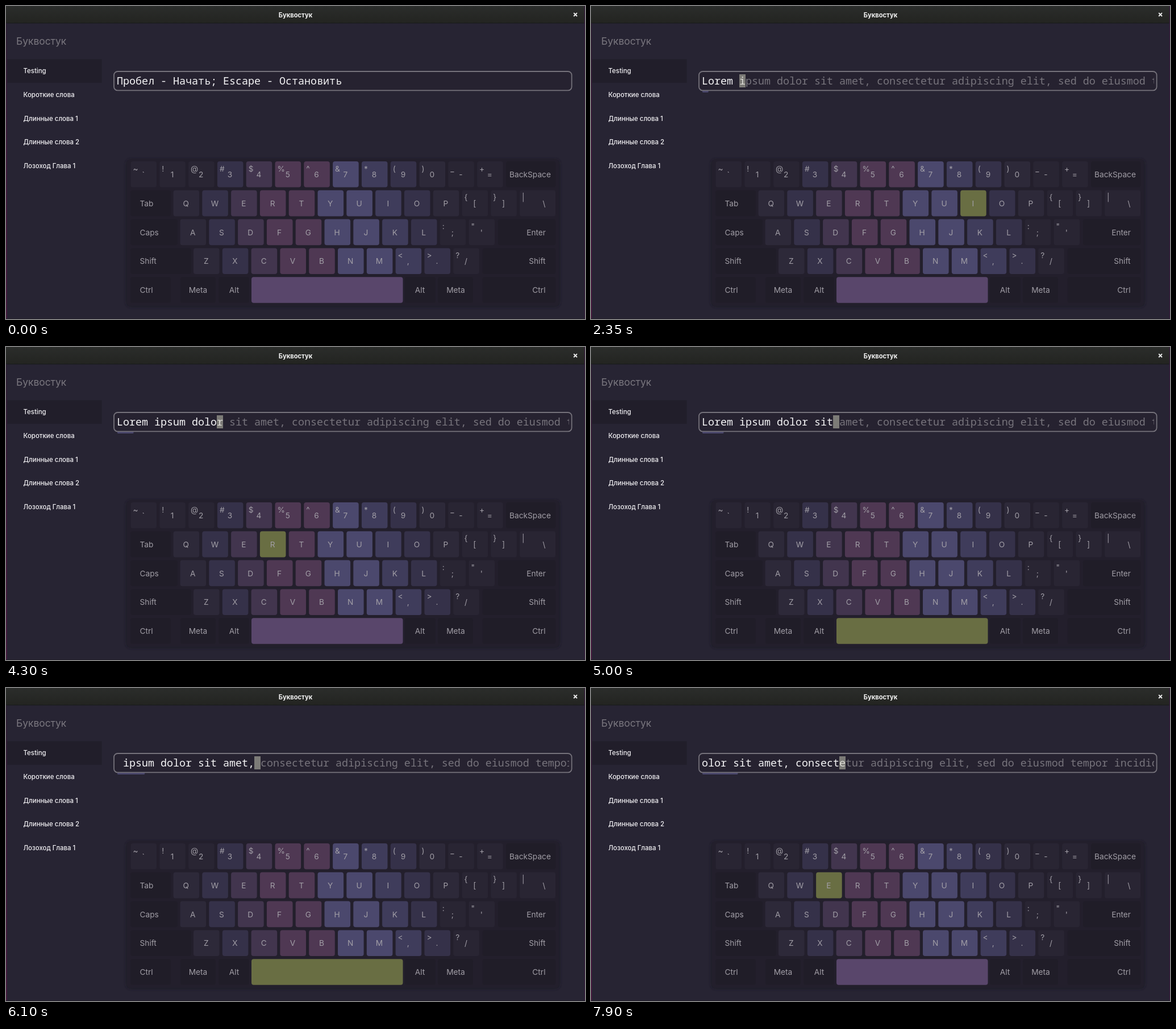
These frames come from a looping animation (1019 by 550 pixels, 8 s). An HTML page:

```html
<!DOCTYPE html>
<html lang="ru">
<head>
<meta charset="utf-8">
<title>Буквостук</title>
<style>
  html, body { margin: 0; width: 100%; height: 100%; overflow: hidden; background: #272433; }
  svg { display: block; width: 100vw; height: 100vh; }
  text { font-family: Inter, "Noto Sans", sans-serif; }
  .key { font-size: 13.7px; fill: #a19ea6; }
  .item { font-size: 11.45px; font-weight: 500; fill: #f3f2f5; }
  .line { font: 500 18.33px "Noto Sans Mono", "DejaVu Sans Mono", monospace; white-space: pre; }
</style>
</head>
<body>
<svg id="stage" viewBox="0 0 1019 550" preserveAspectRatio="none">
  <defs>
    <linearGradient id="bar" x2="0" y2="1">
      <stop offset="0" stop-color="#2b2d2b"/><stop offset="1" stop-color="#232421"/>
    </linearGradient>
    <linearGradient id="edge" x2="0" y2="1">
      <stop offset="0" stop-color="#2a1b30"/><stop offset=".45" stop-color="#43173c"/><stop offset="1" stop-color="#4b1740"/>
    </linearGradient>
    <filter id="soft" x="-5%" y="-5%" width="110%" height="115%"><feGaussianBlur stdDeviation="2"/></filter>
    <clipPath id="field"><rect x="194" y="116" width="797" height="32"/></clipPath>
  </defs>
</svg>
<script>
const LOOP = 8000;
const CELL = 11, LEFT = 195, STEP = 1.784, HOLD = 22;
const KEY = 45.6, PITCH = 50.8, TOP = 273;
const LIT = '#696e43', DARK = '#201d28';
const PROMPT = 'Пробел - Начать; Escape - Остановить';
const TEXT = 'Lorem ipsum dolor sit amet, consectetur adipiscing elit, sed do eiusmod ' +
  'tempor incididunt ut labore et dolore magna aliqua.';

// moment at which each character becomes the current one
const TIMES = [
  650, 1500, 1750, 1900, 2050, 2200, 2350, 2750, 2900, 3050, 3200,
  3450, 3600, 3700, 3850, 4050, 4300, 4400, 4600, 4750, 4850, 5000, 5150,
  5350, 5500, 5650, 5850, 6000, 6200, 6550, 6700, 6850, 7050, 7200, 7450, 7850
];

// key tints by finger zone
const TINT = {
  o: '#292533', a: '#2d2939', b: '#353149', c: '#42354e',
  d: '#4f3853', e: '#4b486d', f: '#3f3c5b'
};
// first key x, base symbols, shifted symbols, zones
const ROWS = [
  [219.5, '`1234567890-=', '~!@#$%^&*()_+', 'ooobcddefbaoo'],
  [294.5, 'QWERTYUIOP[]\\', '          {}|', 'abcddeefbaooo'],
  [306.5, 'ASDFGHJKL;\'', '         :"', 'abcddeefboo'],
  [330, 'ZXCVBNM,./', '       <>?', 'abcddeefbo']
];
// label, row, x, width, label x, anchor
const WIDE = [
  ['BackSpace', 0, 880, 87.5, 922.5, 'middle'],
  ['Tab', 1, 219, 71, 235.5, 'start'],
  ['Caps', 2, 219, 83, 235.5, 'start'],
  ['Enter', 2, 866, 101.5, 950, 'end'],
  ['Shift', 3, 219, 107, 235.5, 'start'],
  ['Shift', 3, 838.5, 129, 949.5, 'end'],
  ['Ctrl', 4, 219, 71, 235.5, 'start'],
  ['Meta', 4, 307, 62, 338, 'middle'],
  ['Alt', 4, 374, 54, 401.5, 'middle'],
  ['Alt', 4, 702, 54, 728.5, 'middle'],
  ['Meta', 4, 760, 62, 791.5, 'middle'],
  ['Ctrl', 4, 838.5, 129, 949.5, 'end']
];
const ITEMS = ['Testing', 'Короткие слова', 'Длинные слова 1', 'Длинные слова 2', 'Лозоход Глава 1'];

const stage = document.getElementById('stage');

function add(tag, attrs, parent = stage) {
  const el = document.createElementNS('http://www.w3.org/2000/svg', tag);
  for (const k in attrs) el.setAttribute(k, attrs[k]);
  parent.appendChild(el);
  return el;
}
const rect = (x, y, width, height, fill, rx = 0, more = {}) =>
  add('rect', { x, y, width, height, fill, rx, ...more });
function label(str, x, y, cls, anchor = 'start', more = {}) {
  const el = add('text', { x, y, class: cls, 'text-anchor': anchor, ...more });
  el.textContent = str;
  return el;
}
const rowY = r => TOP + r * PITCH;

// window
rect(0, 0, 1019, 550, '#272433');
rect(0, 0, 1019, 30, 'url(#bar)');
rect(0, 29.5, 1019, 1, '#191a1b');
rect(0, 30, 1.6, 520, 'url(#edge)');
rect(1017.8, 0, 1.2, 550, '#35193a');
rect(0, 549, 1019, 1, '#1f1c29');
label('Буквостук', 509.5, 19.6, '', 'middle', { 'font-size': 11.2, 'font-weight': 700, fill: '#f2f2f2' });
add('path', { d: 'M999.2 12.2l5.8 5.8m0-5.8l-5.8 5.8', stroke: '#f4f4f4', 'stroke-width': 1.9 });

// sidebar
label('Буквостук', 18, 67.6, '', 'start', { 'font-size': 17.4, fill: '#7a777f' });
rect(2, 93.5, 166.5, 41.5, '#211e2a');
ITEMS.forEach((s, i) => label(s, 30.5, 118.3 + i * 41.7, 'item'));

// input line
const progress = rect(196, 147, 0, 5, '#48456a', 1.5);
rect(190, 115, 805.6, 33.4, '#262230', 6.5, { stroke: '#75727b', 'stroke-width': 1.8 });
const caret = rect(0, 120, CELL, 23, '#7c7b77');
const line = add('text', { x: LEFT, y: 138, class: 'line', 'clip-path': 'url(#field)' });
line.setAttributeNS('http://www.w3.org/XML/1998/namespace', 'xml:space', 'preserve');
const [done, now, rest] = ['#f6f6f7', '#dddcd6', '#77747c'].map(fill => add('tspan', { fill }, line));

// keyboard
rect(211, 269, 764, 260, '#1d1a25', 9, { filter: 'url(#soft)' });
rect(212.5, 268.5, 761, 259, '#231f2c', 8);
const keys = {};
WIDE.forEach(([name, r, x, w, tx, anchor]) => {
  const el = rect(x, rowY(r), w, KEY, DARK, 4);
  if (!keys[name]) keys[name] = { el, fill: DARK };
  label(name, tx, rowY(r) + 28, 'key', anchor);
});
ROWS.forEach(([x0, base, upper, zones], r) => {
  [...base].forEach((ch, i) => {
    const x = x0 + i * PITCH, y = rowY(r);
    const w = ch === '\\' ? 63 : KEY;
    const fill = TINT[zones[i]];
    keys[ch] = { el: rect(x, y, w, KEY, fill, 4), fill };
    label(ch, ch === '\\' ? 947 : x + KEY / 2 - 0.6, y + 28, 'key', 'middle');
    if (upper[i] !== ' ') label(upper[i], x + 4, y + 17.6, 'key');
  });
});
keys[' '] = { el: rect(432, rowY(4), 266.5, KEY, '#59466b', 4), fill: '#59466b' };

let shown;
function show(n) {
  if (n === shown) return;
  shown = n;
  for (const k in keys) keys[k].el.setAttribute('fill', keys[k].fill);
  const idle = n < 0;
  caret.setAttribute('visibility', idle ? 'hidden' : 'visible');
  progress.setAttribute('width', idle ? 0 : n * STEP);
  if (idle) {
    done.textContent = PROMPT;
    now.textContent = rest.textContent = '';
    return;
  }
  const from = Math.max(0, n - HOLD), ch = TEXT[n];
  done.textContent = TEXT.slice(from, n);
  now.textContent = ch;
  rest.textContent = TEXT.slice(n + 1, from + 74);
  caret.setAttribute('x', LEFT + (n - from) * CELL);
  keys[ch.toUpperCase()].el.setAttribute('fill', LIT);
  if (ch !== ch.toLowerCase()) keys.Shift.el.setAttribute('fill', LIT);
}

const start = performance.now();
function tick() {
  const t = (performance.now() - start) % LOOP;
  show(TIMES.filter(at => at <= t).length - 1);
  requestAnimationFrame(tick);
}
tick();
</script>
</body>
</html>
```
